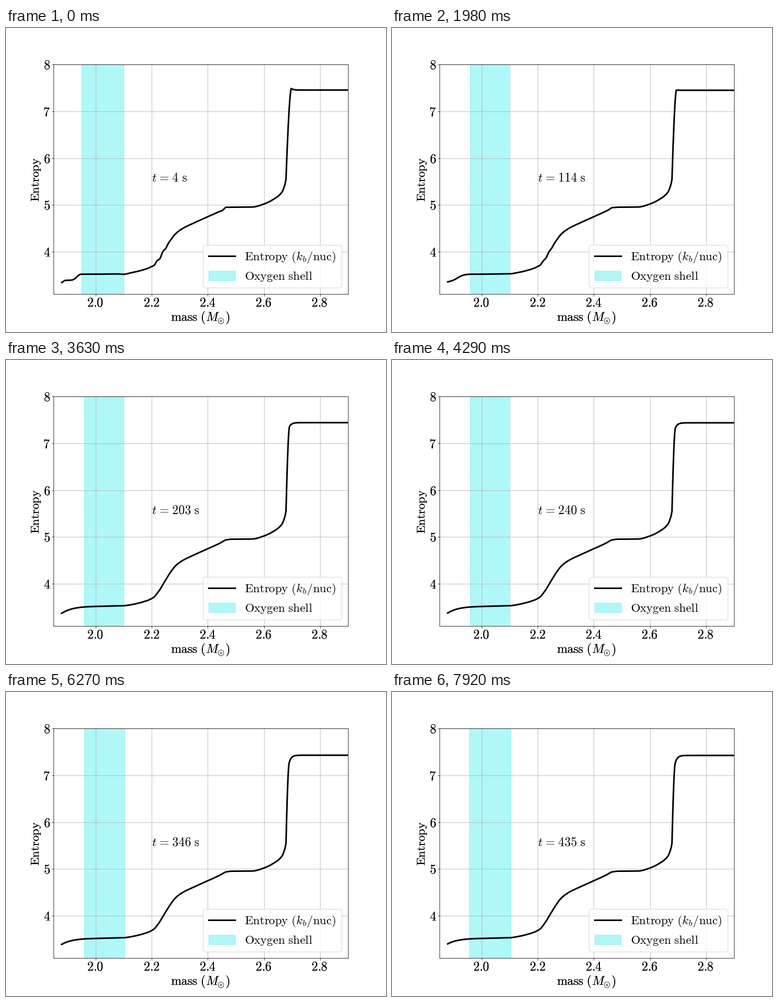
Recreate the animation shown at these times as a matplotlib script. Size 720x576 px, loop 8000 ms.

```python
import numpy as np
import matplotlib.pyplot as plt
from matplotlib.animation import FuncAnimation
from matplotlib.patches import FancyBboxPatch, Rectangle

plt.rcParams["mathtext.fontset"] = "cm"
W, H = 720, 576
STEP = 330        # ms between simulation outputs
TICK = 40         # ms per animation frame
CYAN = (0, 0.9, 0.9)
SHADE = 0.31

fig = plt.figure(figsize=(W / 72, H / 72), dpi=72, facecolor="white")
ax = fig.add_axes([0.125, 0.125, 0.775, 0.755])
ax.set(xlim=(1.85, 2.9), ylim=(3.1, 8),
       xticks=[2.0, 2.2, 2.4, 2.6, 2.8], yticks=range(4, 9))
ax.tick_params(labelbottom=False, labelleft=False)
ax.grid(True, color="#b0b0b0", linewidth=0.8)

# Overlay in pixel units, y pointing down
px = fig.add_axes([0, 0, 1, 1])
px.set(xlim=(0, W), ylim=(H, 0))
px.axis("off")


def label(x, y, tex, size=23, ha="left", repeat=1, **kw):
    for _ in range(repeat):
        t = px.text(x, y, f"${tex}$", fontsize=size, ha=ha, va="baseline", **kw)
    return t


# Axis text is drawn twice for a denser look
for m in ax.get_xticks():
    label(90 + (m - 1.85) / 1.05 * 558 - 0.7, 528, rf"\mathrm{{{m:.1f}}}", 24, "center", 2)
for s in ax.get_yticks():
    label(84, 77.6 + (8 - s) * 88.75, rf"\mathrm{{{s:.0f}}}", 24, "right", 2)
label(368.5, 555.5, r"\mathrm{mass\ (}M_{\odot}\mathrm{)}", 23.6, "center", 2)
label(63, 287, r"\mathrm{Entropy}", 23, "center", 2,
      rotation=90, rotation_mode="anchor")

# Legend
px.add_patch(FancyBboxPatch((373.5, 411.5), 263, 81, facecolor="white", alpha=0.8,
                            edgecolor="0.8", linewidth=1,
                            boxstyle="round,pad=0,rounding_size=5"))
px.plot([383.5, 433.5], [432, 432], color="black", linewidth=3)
px.add_patch(Rectangle((383.5, 459.5), 50, 18, color=CYAN, alpha=SHADE, linewidth=1))
label(451.5, 440, r"\mathrm{Entropy\ (}k_b\mathrm{/nuc)}", 22.8)
label(451.5, 477, r"\mathrm{Oxygen\ shell}", 22.9)


def monotone(x, px_, py):
    """Cubic Hermite curve through the points without overshoot."""
    h, d = np.diff(px_), np.diff(py) / np.diff(px_)
    same = d[:-1] * d[1:] > 0
    slope = np.zeros(len(px_))
    slope[[0, -1]] = d[[0, -1]]
    slope[1:-1][same] = 2 * d[:-1][same] * d[1:][same] / (d[:-1] + d[1:])[same]
    i = np.clip(np.searchsorted(px_, x) - 1, 0, len(h) - 1)
    t = (x - px_[i]) / h[i]
    return (py[i] + t * t * (3 - 2 * t) * (py[i + 1] - py[i])
            + h[i] * t * (1 - t) * ((1 - t) * slope[i] - t * slope[i + 1]))


def fade(step, life):
    return np.exp(-(step / life) ** 2)


def bell(x, mid, width):
    return np.exp(-((x - mid) / width) ** 2)


# Key points of the smoothed profile, left of the cliff
KEYS = np.array([(105, 466), (160, 466), (223, 465), (234, 463.6), (265, 456),
                 (279, 449.3), (290, 436), (300, 419.5), (312, 400.5), (321, 389.2),
                 (334, 379.5), (355, 369.2), (404, 347), (417, 340.3), (428, 339),
                 (466, 338.7), (488, 333), (510, 321.8), (522, 311), (528, 296),
                 (530, 286)], float).T
X = np.arange(105, 650, 1.0)
BASE = monotone(X, *KEYS)


def profile(step):
    """Sharp steps of the first outputs wear away as mixing goes on."""
    new = fade(step, 5)
    d = X - 105
    ledge = 4 * new * (1 - np.exp(-(d / 4) ** 2))
    y = BASE + (15.6 - 0.2 * step - ledge) * np.exp(-(d / (20 + 9.5 * new)) ** (1 + 6 * new))
    y += 1.2 * new * bell(X, 223, 8)
    y += 2.2 * fade(step, 7) * np.cos((X - 291) * 2 * np.pi / 11.8) * bell(X, 293, 13)
    y -= 0.6 * fade(step, 6) * (X - 413) * bell(X, 413, 5)

    # Steep rise to the upper shelf, first overshooting, later rounded
    width = 5.8 + 4.2 * fade(step, 8)
    shoulder = 5.5 - 8.5 * fade(step, 9.5)
    shelf = 120 - 2.9 * fade(step, 16)
    top = shelf + shoulder * np.exp((540 - np.maximum(X, 530 + width)) / 4)
    left = np.clip(1 - (X - 530) / width, 0, 1) ** 1.6
    return np.where(X > 530, top + (286 - top) * left, y)


def borders(step):
    """Shell borders, snapped to the mass grid."""
    inner = np.interp(step, [3, 8, 12, 24], [1.95, 1.965, 1.961, 1.9574])
    outer = np.interp(step, [3, 4, 8, 11, 13, 14],
                      [2.1, 2.094, 2.104, 2.102, 2.102, 2.104])
    return [round(m / 0.005) * 0.005 - 0.0004 for m in (inner, outer)]


def seconds(step):
    return round(float(np.interp(step, [0, 4, 8, 11, 16, 21, 24],
                                 [4, 78, 151, 203, 295, 380, 435])))


shell = Rectangle((1.95, 3.1), 0.15, 4.9, color=CYAN, alpha=SHADE, linewidth=1, zorder=1)
ax.add_patch(shell)
curve, = px.plot([], [], color="black", linewidth=3, solid_joinstyle="round")
curve.set_clip_path(ax.patch)
clock = label(275.5, 291, "t", 23.3)


def update(i):
    step = (i * TICK + 30) // STEP
    curve.set_data(X + 0.5, profile(step) + 0.5)
    lo, hi = borders(step)
    shell.set_x(lo)
    shell.set_width(hi - lo)
    clock.set_text(rf"$t\hspace{{0.1}}=\hspace{{0.1}}{seconds(step)}\ \mathrm{{s}}$")
    return shell, curve, clock


anim = FuncAnimation(fig, update, frames=8000 // TICK, interval=TICK,
                     init_func=lambda: update(0), repeat=True, repeat_delay=0)
plt.show()
```
